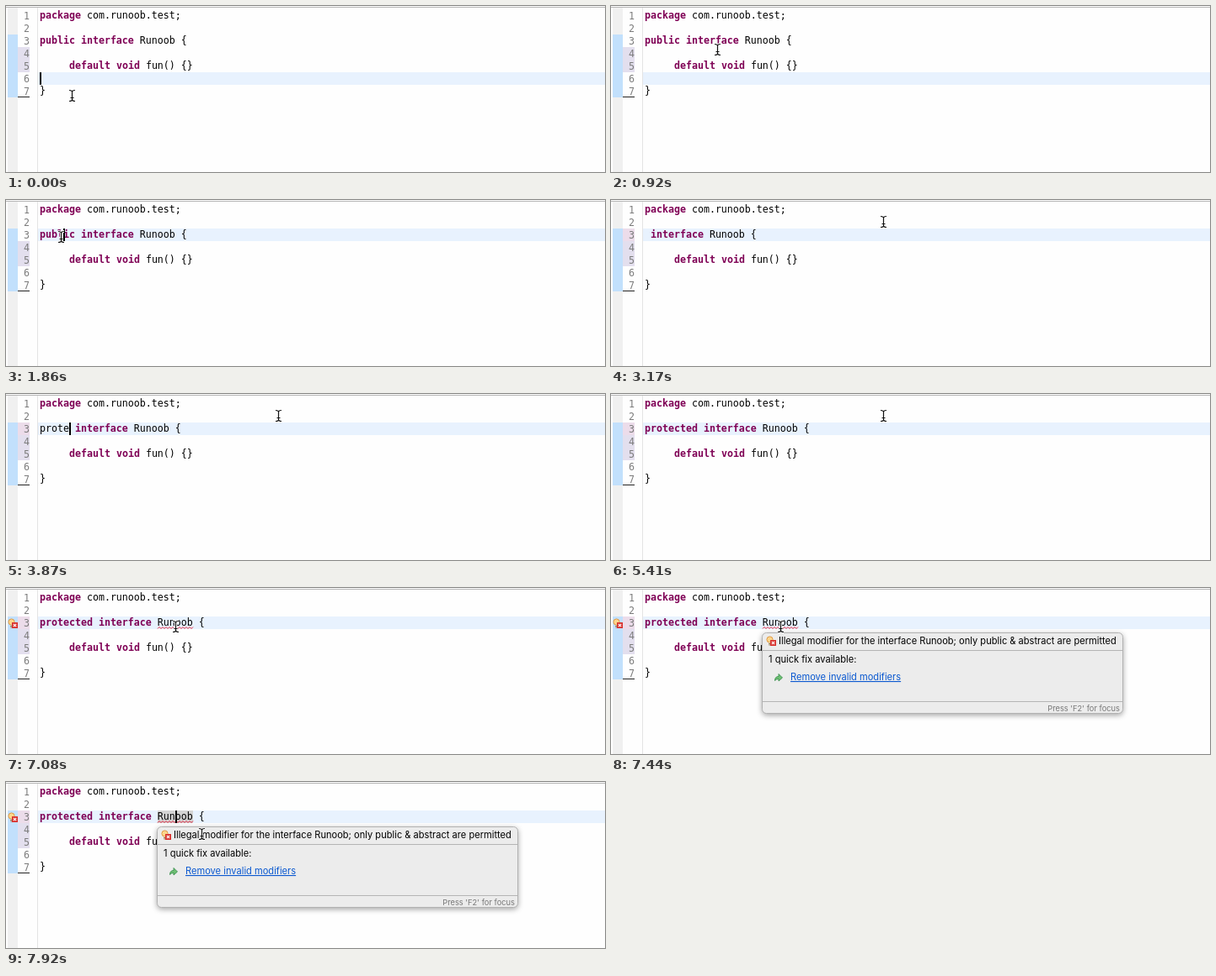
Write an HTML page that moves like this. It is 711 px wide and 198 px high and loops after 8000 ms.

```html
<!DOCTYPE html>
<html lang="en">
<head>
<meta charset="utf-8">
<title>Code editor</title>
<style>
html, body { margin: 0; width: 711px; height: 198px; overflow: hidden; background: #fefefe; }
svg { display: block; }
text { white-space: pre; }
.code { font: 11.627px "DejaVu Sans Mono", monospace; fill: #000; }
.code .kw { font-weight: bold; fill: #7f0055; }
.code.num { fill: #7c7c7c; }
.tip { font: 11.1px Inter, sans-serif; fill: #000; }
.tip .small { font-size: 9.3px; fill: #777; }
.tip .link { fill: #0a58d0; text-decoration: underline; }
.box { filter: drop-shadow(0 2px 3px rgba(0, 0, 0, .35)); }
</style>
</head>
<body>
<svg width="711" height="198" viewBox="0 0 711 198">
  <defs>
    <g id="error">
      <circle cx="4.5" cy="4.5" r="3.6" fill="#fbd68c" stroke="#e09a45"/>
      <path d="M3 9.5H6M3.3 11H5.7" stroke="#9a7a50"/>
      <rect x="5" y="5" width="7" height="7" fill="#d8322f"/>
      <path d="M6.8 6.8L10.2 10.2M10.2 6.8L6.8 10.2" stroke="#fff" stroke-width="1.2"/>
    </g>
    <path id="beam" fill="none" d="M-3.5 -6.5Q0 -6.5 0 -4.5Q0 -6.5 3.5 -6.5M0 -4.5V4.5M-3.5 6.5Q0 6.5 0 4.5Q0 6.5 3.5 6.5M-2 2.5H2"/>
  </defs>
  <rect width="711" height="198" fill="#fefefe"/>
  <rect x="2" y="2" width="12" height="196" fill="#f0f0f0"/>
  <rect x="2" y="34" width="12" height="75" fill="#c2e0fc"/>
  <rect x="14" y="49" width="14" height="30" fill="#e3dfee"/>
  <rect id="edited" x="14" y="34" width="14" height="15" fill="#ecdcea"/>
  <rect x="14" y="108" width="14" height="1" fill="#222"/>
  <rect x="37" y="2" width="1" height="196" fill="#e4e4e4"/>
  <rect y="1" width="711" height="1" fill="#b6b6b6"/>
  <rect id="row" x="38" width="673" height="15" fill="#e8f2fe"/>
  <rect id="mark" x="180" y="34" width="42" height="15" fill="#d4d4d4"/>
  <g id="lines"></g>
  <g id="problem">
    <use href="#error" x="2" y="36"/>
    <path id="wave" fill="none" stroke="#e0203c"/>
  </g>
  <rect id="caret" width="2" height="15" fill="#000"/>
  <g id="tip" class="tip">
    <rect class="box" x="179.5" y="53.5" width="428" height="96" rx="5" fill="#ececec" stroke="#b2b2b2"/>
    <path d="M180 74.5H607M180 135.5H607" stroke="#b4b4b4"/>
    <use href="#error" x="184" y="57"/>
    <text x="199" y="67">Illegal modifier for the interface Runoob; only public &amp; abstract are permitted</text>
    <text x="187" y="89">1 quick fix available:</text>
    <path d="M194.5 110.5Q194.5 105.5 199 105.5V102.5L203.5 107L199 111V108.5Q196 108.5 194.5 110.5Z" fill="#6fbf73" stroke="#2f8a45" stroke-width=".8"/>
    <text class="link" x="213" y="110">Remove invalid modifiers</text>
    <text class="small" x="604" y="147" text-anchor="end">Press 'F2' for focus</text>
  </g>
  <g id="mouse">
    <use href="#beam" stroke="#fff" stroke-width="3"/>
    <use href="#beam" stroke="#111" stroke-width="1.2"/>
  </g>
</svg>
<script>
const LOOP = 8000, LEFT = 40, CHAR = 7, ROW = 15;
const BLINK = 590, TICK = 117;
const CLICK = 1750, WORD_END = 2100, CLEAR = 3170, NAME_CLICK = 6490;

const $ = id => document.getElementById(id);
const rowTop = n => 4 + (n - 1) * ROW;
const show = (id, on) => $(id).setAttribute('visibility', on ? 'visible' : 'hidden');
const paint = s => s.replace(/\b(package|public|protected|interface|default|void)\b/g, '<tspan class="kw">$1</tspan>');

function addText(x, line, s, cls = 'code') {
  const el = document.createElementNS('http://www.w3.org/2000/svg', 'text');
  el.setAttribute('x', x);
  el.setAttribute('y', rowTop(line) + 11);
  el.setAttribute('class', cls);
  el.innerHTML = paint(s);
  $('lines').append(el);
  return el;
}

for (let n = 1; n < 8; n++) addText(21, n, String(n), 'code num').setAttribute('dy', 1);
addText(LEFT, 1, 'package com.runoob.test;');
const header = addText(LEFT, 3, '');
addText(LEFT + 5 * CHAR, 5, 'default void fun() {}');
addText(LEFT, 7, '}');
$('wave').setAttribute('d', 'M180 48.5' + 'l2 -2l2 2'.repeat(10) + 'l2 -2');

// when each letter of "protected" is typed
const keys = [3280, 3280, 3520, 3750, 3870, 4350, 4930, 5050, 5410];

// moments at which the caret starts a fresh blink
const wakes = [-130, CLICK, WORD_END, 3640, NAME_CLICK];

// mouse path: tick, x, y
const path = [[0, 78, 107], [7, 130, 54], [8, 126, 52], [11, 124, 51], [16, 65, 44], [18, 104, 33],
  [20, 323, 26], [52, 323, 26], [54, 350, 68], [57, 215, 50], [59, 201, 46], [64, 201, 46], [67, 232, 62]];

function mouseAt(t) {
  const k = Math.floor((t + 20) / TICK);
  const i = path.findIndex(p => p[0] > k);
  if (i < 0) return path[path.length - 1].slice(1);
  const [a, b] = [path[i - 1], path[i]];
  const u = (k - a[0]) / (b[0] - a[0]);
  return [1, 2].map(j => Math.round(a[j] + (b[j] - a[j]) * u));
}

function caretColumn(t, typed) {
  if (t < CLICK) return 0;
  if (t < WORD_END) return 4;
  if (t < CLEAR) return 6;
  return t < NAME_CLICK ? typed : 23;
}

let word;
function draw(t) {
  const typed = keys.filter(k => k <= t).length;
  const next = t < CLEAR ? 'public' : 'protected'.slice(0, typed);
  if (next !== word) {
    word = next;
    header.innerHTML = paint(word + ' interface Runoob {');
  }

  const y = rowTop(t < CLICK ? 6 : 3);
  const awake = t - wakes.filter(w => w <= t).pop();
  $('row').setAttribute('y', y);
  $('caret').setAttribute('x', LEFT + caretColumn(t, typed) * CHAR);
  $('caret').setAttribute('y', y);
  show('caret', Math.floor(awake / BLINK) % 2 === 0);

  show('edited', t >= CLEAR);
  show('problem', t >= 6250);
  show('tip', t >= 7440);
  show('mark', t >= 7680);

  const [mx, my] = mouseAt(t);
  $('mouse').setAttribute('transform', `translate(${mx + .5} ${my})`);
}

const began = performance.now();
function frame() {
  draw((performance.now() - began) % LOOP);
  requestAnimationFrame(frame);
}
frame();
</script>
</body>
</html>
```
